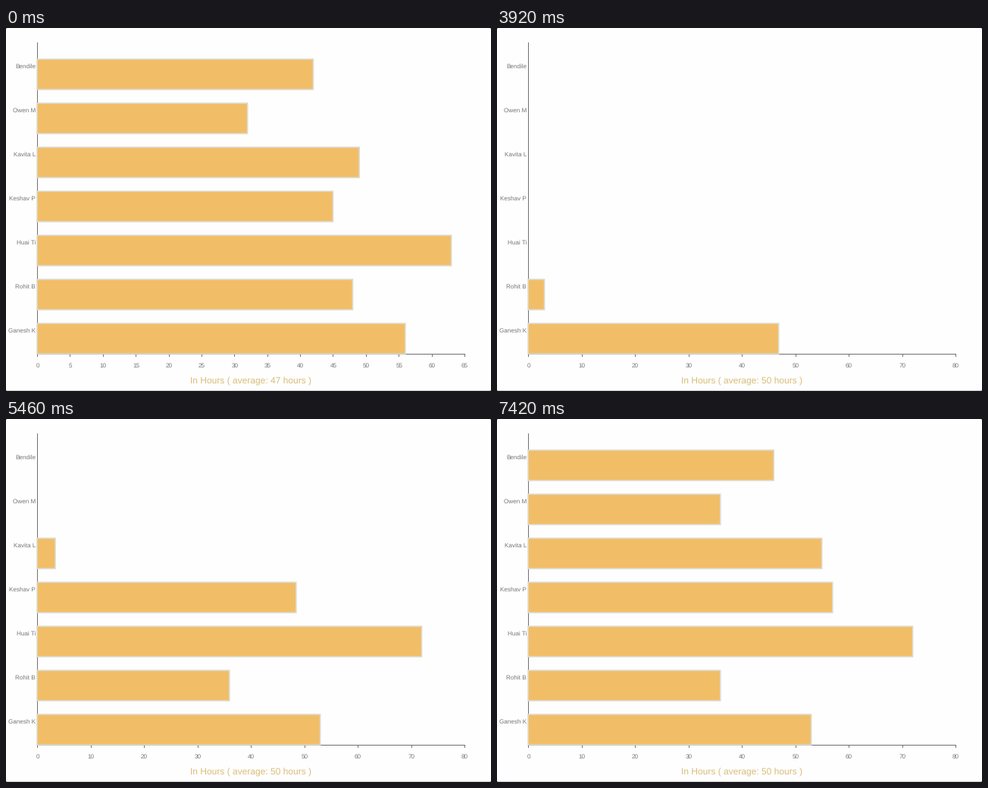
Write a matplotlib script that moves like this. It is 640 px wide and 478 px high and loops after 8000 ms.

```python
import matplotlib.pyplot as plt
from matplotlib.animation import FuncAnimation
from matplotlib.patches import Rectangle

W, H, DPI = 640, 478, 100
PX = 72 / DPI                      # points per pixel
LOOP, STEP, HOLD = 8000, 20, 70    # ms
LEFT, SPAN, BASE = 41, 564, 429
TOP, PITCH, BAR_H = 41, 58, 40
SWITCH, START = 3080, 3046
GROW, DELAY = 1260, 525

NAMES = ["Bendile", "Owen M", "Kavita L", "Keshav P", "Huai Ti", "Rohit B", "Ganesh K"]
WEEKS = [
    dict(hours=[42, 32, 49, 45, 63, 48, 56], top=65, step=5, mean=47),
    dict(hours=[46, 36, 55, 57, 72, 36, 53], top=80, step=10, mean=50),
]

FILL, EDGE, LINE = "#f1be67", "#dedbd0", "#707070"
LABEL, TITLE = "#777777", "#d8be78"

plt.rcParams["font.family"] = "Liberation Sans"
plt.rcParams["text.hinting"] = "none"
plt.rcParams["path.snap"] = False

fig = plt.figure(figsize=(W / DPI, H / DPI), dpi=DPI, facecolor="#fefefe")
ax = fig.add_axes([0, 0, 1, 1])
ax.set_xlim(0, W)
ax.set_ylim(H, 0)
ax.axis("off")


def line(x0, y0, x1, y1, color=LINE):
    return ax.plot([x0, x1], [y0, y1], color=color, lw=PX,
                   solid_capstyle="butt", zorder=1)[0]


def label(x, y, text, size=8.1, color=LABEL, ha="center"):
    return ax.text(x, y, text, fontsize=size * PX, color=color, ha=ha,
                   va="baseline", zorder=4)


def window_edge():
    line(0, H - 0.5, W, H - 0.5, "#cccccc")
    for x in (0, W - 1):
        for y in (0, H - 1):
            ax.add_patch(Rectangle((x, y), 1, 1, fc="#777777", lw=0))


def scale(week):
    """Ticks, tick labels and title of one week."""
    parts = []
    for v in range(0, week["top"] + 1, week["step"]):
        x = LEFT + 0.5 + SPAN * v / week["top"]
        parts.append(line(int(x) + 0.5, BASE, int(x) + 0.5, BASE + 4))
        parts.append(label(x, 447, str(v)))
    title = f"In Hours ( average: {week['mean']} hours )"
    parts.append(label(323.2, 469, title, 12, TITLE))
    return parts


def ease(t):
    t = min(max(t, 0), 1)
    return 4 * t ** 3 if t < 0.5 else 1 - 4 * (1 - t) ** 3


window_edge()
line(LEFT + 0.5, 19, LEFT + 0.5, BASE + 1)
line(LEFT, BASE + 0.5, LEFT + SPAN + 1, BASE + 0.5)
scales = [scale(w) for w in WEEKS]
bars = []
for i, name in enumerate(NAMES):
    y = TOP + PITCH * i
    label(39, y + 12, name, ha="right")
    bars.append(ax.add_patch(Rectangle((LEFT, y), 0, BAR_H, fc=FILL, ec=EDGE,
                                       lw=1.6 * PX, joinstyle="miter", zorder=2)))


def update(n):
    t = (n * STEP + STEP // 2) // HOLD * HOLD
    now = int(t >= SWITCH)
    week = WEEKS[now]
    for k, parts in enumerate(scales):
        for part in parts:
            part.set_visible(k == now)
    for i, bar in enumerate(bars):
        order = len(bars) - 1 - i      # bars grow from the bottom up
        grown = ease((t - START - order * DELAY) / GROW) if now else 1
        bar.set_visible(grown > 0)
        bar.set_width(SPAN * week["hours"][i] / week["top"] * grown)
    return bars


anim = FuncAnimation(fig, update, frames=LOOP // STEP, interval=STEP,
                     repeat=True, repeat_delay=0, blit=False)
plt.show()
```
